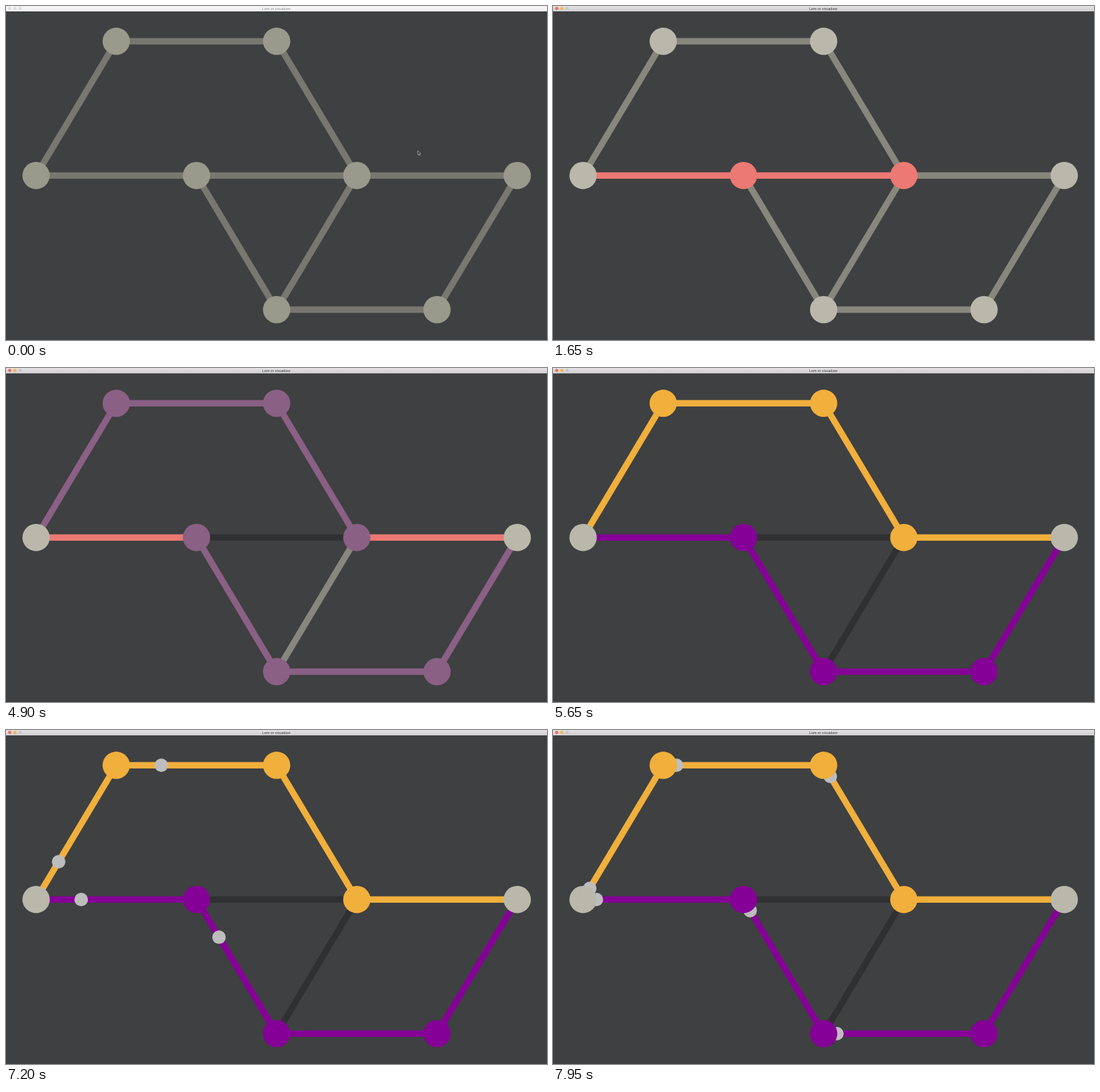
An HTML page for the animation above (8000 ms loop, 800 px wide and 495 px high).

```html
<!DOCTYPE html>
<html lang="en">
<head>
<meta charset="utf-8">
<title>Lem-in visualizer</title>
<style>
  html, body { margin: 0; width: 100%; height: 100%; overflow: hidden; background: #3f4041; }
  svg { display: block; width: 100vw; height: 100vh; }
  text { font: 5.2px Inter, "Liberation Sans", sans-serif; text-anchor: middle; }
  line { stroke-width: 9.4; }
</style>
</head>
<body>
<svg viewBox="0 0 800 495" preserveAspectRatio="none">
  <defs>
    <linearGradient id="active" x2="0" y2="1">
      <stop offset="0" stop-color="#e4e2e4"/>
      <stop offset="1" stop-color="#cfcdcf"/>
    </linearGradient>
  </defs>
  <rect width="800" height="495" fill="#3f4041"/>
  <g id="edges"></g>
  <g id="ants"></g>
  <g id="nodes"></g>
  <rect id="bar" width="800" height="8"/>
  <g id="lights">
    <circle cx="5.5" cy="3.6" r="2.4"/>
    <circle cx="13.2" cy="3.6" r="2.4"/>
    <circle cx="20.9" cy="3.6" r="2.4"/>
  </g>
  <text id="title" x="400" y="5.5">Lem-in visualizer</text>
  <path id="cursor" d="M0 0V6L1.4 4.8L2.4 7L3.4 6.5L2.4 4.4H4.2Z" fill="#222" stroke="#ddd" stroke-width=".6"/>
</svg>
<script>
const LOOP = 8000;
const RED = '#ec7973', MAUVE = '#8a6085', DARK = '#2f3031';
const ORANGE = '#f1af3c', PURPLE = '#850096';

const nodes = {
  start: [44.5, 251.2], a: [163, 52.3], b: [400.2, 52.3], c: [281.7, 251.2],
  d: [518.8, 251.2], e: [400.2, 450], f: [637.4, 450], end: [756, 251.2]
};
const edges = ['start-a', 'a-b', 'b-d', 'start-c', 'c-d', 'd-end', 'c-e', 'd-e', 'e-f', 'f-end'];
const upper = ['start', 'a', 'b', 'd', 'end'];
const lower = ['start', 'c', 'e', 'f', 'end'];

// time, colour, then the parts that take it
const steps = [
  [1250, RED, 'start-c', 'c'],
  [1650, RED, 'c-d', 'd'],
  [2000, RED, 'd-end'],
  [2400, MAUVE, 'start-a', 'a'],
  [2800, MAUVE, 'a-b', 'b'],
  [3100, MAUVE, 'b-d', 'd'],
  [3500, DARK, 'c-d'],
  [3500, MAUVE, 'c'],
  [3900, MAUVE, 'c-e', 'e'],
  [4300, MAUVE, 'e-f', 'f'],
  [4650, MAUVE, 'f-end'],
  [5050, ORANGE, 'start-a', 'a', 'a-b', 'b', 'b-d', 'd', 'd-end'],
  [5050, PURPLE, 'start-c', 'c', 'c-e', 'e', 'e-f', 'f', 'f-end'],
  [5050, DARK, 'd-e']
];

// time and number of edges walked by the leading pair of ants
const walk = [[6100, 0], [6450, 0.4], [6957, 1], [7200, 1.28], [7880, 2], [8000, 2.14]];

const $ = id => document.getElementById(id);
const parts = {};

function add(parent, tag, attrs) {
  const el = document.createElementNS('http://www.w3.org/2000/svg', tag);
  for (const k in attrs) el.setAttribute(k, attrs[k]);
  return $(parent).appendChild(el);
}

for (const id of edges) {
  const [p, q] = id.split('-').map(n => nodes[n]);
  parts[id] = add('edges', 'line', { x1: p[0], y1: p[1], x2: q[0], y2: q[1] });
}
for (const id in nodes) {
  const [cx, cy] = nodes[id];
  parts[id] = add('nodes', 'circle', { cx, cy, r: 20.2 });
}
const ants = [];
for (let rank = 0; rank < 3; rank++) {
  for (const path of [upper, lower]) {
    ants.push({ rank, path, el: add('ants', 'circle', { r: 10, fill: '#bdbdbd' }) });
  }
}

function progress(t) {
  for (let i = 1; i < walk.length; i++) {
    const [t0, v0] = walk[i - 1], [t1, v1] = walk[i];
    if (t < t1) return v0 + (v1 - v0) * Math.max(0, (t - t0) / (t1 - t0));
  }
  return walk[walk.length - 1][1];
}

function drawBar(t) {
  const on = t >= 550;
  const hues = on ? ['#ee6b60', '#f3b64c', '#c9c7c9'] : ['#dcdcdc', '#dcdcdc', '#dcdcdc'];
  $('bar').setAttribute('fill', on ? 'url(#active)' : '#f5f3f6');
  $('title').setAttribute('fill', on ? '#333' : '#8a8a8a');
  [...$('lights').children].forEach((el, i) => el.setAttribute('fill', hues[i]));
}

function drawGraph(t) {
  const bright = t >= 950;
  const tint = {};
  for (const id in parts) {
    tint[id] = id in nodes ? (bright ? '#b9b8ab' : '#99998c') : (bright ? '#88877e' : '#787770');
  }
  for (const [at, colour, ...ids] of steps) {
    if (t >= at) for (const id of ids) tint[id] = colour;
  }
  for (const id in parts) parts[id].setAttribute(id in nodes ? 'fill' : 'stroke', tint[id]);
}

function drawAnts(t) {
  const lead = progress(t);
  for (const { rank, path, el } of ants) {
    const pos = Math.max(0, lead - rank);
    const i = Math.floor(pos), k = pos - i;
    const p = nodes[path[i]], q = nodes[path[i + 1]];
    el.setAttribute('cx', p[0] + (q[0] - p[0]) * k);
    el.setAttribute('cy', p[1] + (q[1] - p[1]) * k);
  }
}

function drawCursor(t) {
  const k = Math.min(1, Math.max(0, (t - 1150) / 200));
  $('cursor').setAttribute('transform', `translate(${609 + 196 * k} ${214.5 - 8 * k})`);
}

function frame(now) {
  const t = now % LOOP;
  drawBar(t);
  drawGraph(t);
  drawAnts(t);
  drawCursor(t);
}

const begin = performance.now();
function tick() {
  frame(performance.now() - begin);
  requestAnimationFrame(tick);
}
tick();
</script>
</body>
</html>
```
